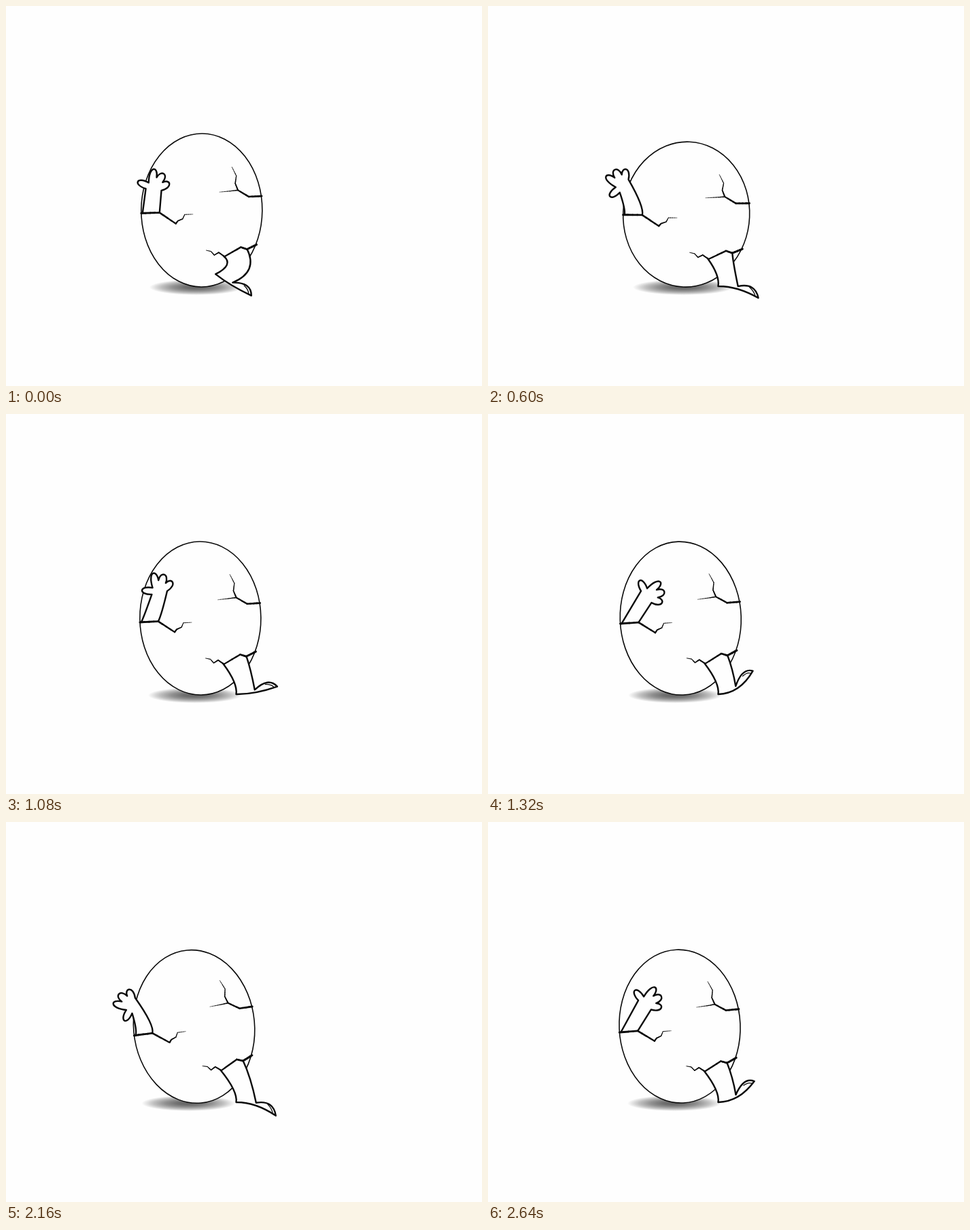
These frames come from a looping animation (700x560 px, 2760 ms). An HTML page with a canvas:

```html
<!DOCTYPE html>
<html lang="en">
<head>
<meta charset="utf-8">
<title>Hatching egg</title>
<style>
  html, body { margin: 0; width: 100%; height: 100%; overflow: hidden; background: #fefefe; }
  canvas { display: block; width: 700px; height: 560px; }
</style>
</head>
<body>
<canvas id="stage" width="700" height="560"></canvas>
<script>
const ctx = document.getElementById('stage').getContext('2d');
const LOOP = 2760, STEP = 120, WAVE = LOOP / STEP / 2;
const INK = '#0a0a0a', PAPER = '#fefefe';
const PIVOT = [287, 414];
const start = performance.now();

// hand outline around the middle of the wrist
const KNUCKLES = [[-11.5, -1], [-7.5, -10], [4, -18], [13, -11], [11.5, 1]];
const TIPS = [[-23.5, -11], [-1, -30], [14.5, -23.5], [23, -9]];

const clamp = v => Math.min(1, Math.max(0, v));
const mix = (a, b, k) => a + (b - a) * k;
const mixPt = (p, q, k) => [mix(p[0], q[0], k), mix(p[1], q[1], k)];
const add = (p, q) => [p[0] + q[0], p[1] + q[1]];
const wave = (s, peak) => Math.cos(2 * Math.PI * (s - peak) / WAVE);

function rotate([x, y], deg) {
  const a = deg * Math.PI / 180, c = Math.cos(a), s = Math.sin(a);
  return [x * c - y * s, x * s + y * c];
}

// places points given around an origin and turned by an angle
const frame = (origin, deg) => p => add(origin, rotate(p, deg));

// slow roll to the left, quicker roll back
function tiltAt(s) {
  if (s < 3) s += LOOP / STEP;
  const out = (s - 3) / 15, back = (s - 18) / 8;
  return s < 18
    ? mix(4.3, -5.3, out + .45 * out * (1 - out))
    : mix(-5.3, 4.3, back ** 1.8);
}

function poseAt(s) {
  const awake = clamp((s - 3) / 2);
  const planted = clamp(1 - Math.abs(s - 7) / 2);
  const forward = awake * (1 - .57 * planted);
  const swing = mix(-8 - 28 * wave(s, 11.7), -4, planted);
  return {
    tilt: tiltAt(s),
    squash: clamp(2 - Math.abs(s - 5) / 2),
    reach: mix(34.6, 45, awake),
    lean: mix(5, 6 + 27 * wave(s, 11), awake),
    hand: mix(1, -12 + 67 * wave(s, 12), awake),
    forward,
    foot: mix(31, swing, awake)
  };
}

function ink(width) {
  ctx.lineWidth = width;
  ctx.stroke();
}

function shadow({ tilt, squash }) {
  ctx.save();
  ctx.translate(279 + 2 * tilt + 3 * squash, 414.5);
  ctx.scale(69 + 5 * squash, 11.5);
  const g = ctx.createRadialGradient(0, 0, 0, 0, 0, 1);
  for (let r = 0; r <= 1; r += .25) {
    g.addColorStop(r, `rgba(0,0,0,${.62 * (1 - r ** 1.7)})`);
  }
  ctx.fillStyle = g;
  ctx.beginPath();
  ctx.arc(0, 0, 1, 0, 7);
  ctx.fill();
  ctx.restore();
}

function egg(at, sx, sy, tilt) {
  ctx.beginPath();
  ctx.ellipse(...at(287, 301), 89 * sx, 113 * sy, tilt * Math.PI / 180, 0, 7);
  ctx.fill();
  ink(1.6);
}

function leg(at, { forward, foot }) {
  const drop = [0, 28 * forward * (1 - forward)];
  const heel = add(mixPt(at(308, 395), [338.5, 413], forward), drop);
  const calf = add(mixPt(at(335, 381), [341, 397], forward), drop);
  const shin = mixPt(at(371, 391), [360, 376], Math.sqrt(forward));
  const onFoot = frame(heel, foot);
  const curl = mix(3.5, -.5 * foot, forward);
  const sole = onFoot([27, curl]), tip = onFoot([61.5, 0]);
  const top = onFoot([51, curl * .3 - 18]), ankle = onFoot([28, curl * .5 - 4]);

  ctx.beginPath();
  ctx.moveTo(...at(320, 368.5));
  ctx.quadraticCurveTo(...calf, ...heel);
  ctx.quadraticCurveTo(...sole, ...tip);
  ctx.quadraticCurveTo(...top, ...ankle);
  ctx.quadraticCurveTo(...shin, ...at(354, 357.5));
  ctx.fill();
  ink(2.4);

  // toenail
  const arch = mixPt(mixPt(tip, ankle, .5), top, .5);
  ctx.beginPath();
  ctx.moveTo(...mixPt(arch, sole, .15));
  ctx.quadraticCurveTo(...mixPt(arch, tip, .4), ...mixPt(tip, ankle, .15));
  ink(1.3);
}

function finger(from, tip, to, onHand) {
  const mid = mixPt(from, to, .5);
  const dx = tip[0] - mid[0], dy = tip[1] - mid[1], k = 7 / Math.hypot(dx, dy);
  const far = mixPt(mid, tip, 4 / 3);
  const handles = [add(far, [dy * k, -dx * k]), add(far, [-dy * k, dx * k])];
  ctx.bezierCurveTo(...[...handles, to].flatMap(onHand));
}

function arm(at, { tilt, reach, lean, hand }) {
  const left = at(200, 306), right = at(225, 305);
  const wrist = frame(at(213, 305.5), tilt + lean)([0, -reach]);
  const onHand = frame(wrist, tilt + hand);
  const bend = clamp(-hand / 75);
  const edge = (base, end, push) => add(mixPt(base, end, .22), [push * bend, 0]);
  const wristL = onHand(KNUCKLES[0]), wristR = onHand(KNUCKLES[4]);

  ctx.beginPath();
  ctx.moveTo(...left);
  ctx.quadraticCurveTo(...edge(left, wristL, 4), ...wristL);
  TIPS.forEach((tip, i) => finger(KNUCKLES[i], tip, KNUCKLES[i + 1], onHand));
  ctx.quadraticCurveTo(...edge(right, wristR, 9), ...right);
  ctx.fill();
  ink(2.4);
}

// a jagged line whose weight runs from one end to the other
function crack(at, from, to, ...pts) {
  const n = (pts.length - 1) * 4;
  for (let i = 0; i < n; i++) {
    const seg = i >> 2, k = i % 4 / 4;
    const a = at(...pts[seg]), b = at(...pts[seg + 1]);
    ctx.beginPath();
    ctx.moveTo(...mixPt(a, b, k));
    ctx.lineTo(...mixPt(a, b, k + .25));
    ink(mix(from, to, i / n));
  }
}

function cracks(at) {
  crack(at, .8, 3, [331, 237], [337.5, 250], [336, 261], [340, 271], [356, 280.5], [375, 279.5]);
  crack(at, 1.6, .4, [340, 271], [328, 272.5], [313, 274]);
  crack(at, 3, .5, [198, 306], [225, 305], [249, 321], [252, 317], [259, 314], [262, 307.5], [274, 307]);
  crack(at, .8, 3.2, [294, 360], [301, 361.5], [306, 367], [312.5, 363], [321, 369], [345, 355], [354, 358], [368, 351]);
}

function draw(s) {
  const pose = poseAt(s);
  const sx = 1 + .045 * pose.squash, sy = 1 - .053 * pose.squash;
  const onBody = frame(PIVOT, pose.tilt);
  const at = (x, y) => onBody([(x - PIVOT[0]) * sx, (y - PIVOT[1]) * sy]);

  ctx.fillStyle = PAPER;
  ctx.fillRect(0, 0, 700, 560);
  shadow(pose);
  ctx.fillStyle = PAPER;
  ctx.strokeStyle = INK;
  ctx.lineCap = ctx.lineJoin = 'round';
  egg(at, sx, sy, pose.tilt);
  leg(at, pose);
  arm(at, pose);
  cracks(at);
}

function tick() {
  const t = (performance.now() - start) % LOOP;
  draw(Math.max(1, Math.floor(t / STEP)));
  requestAnimationFrame(tick);
}
tick();
</script>
</body>
</html>
```
